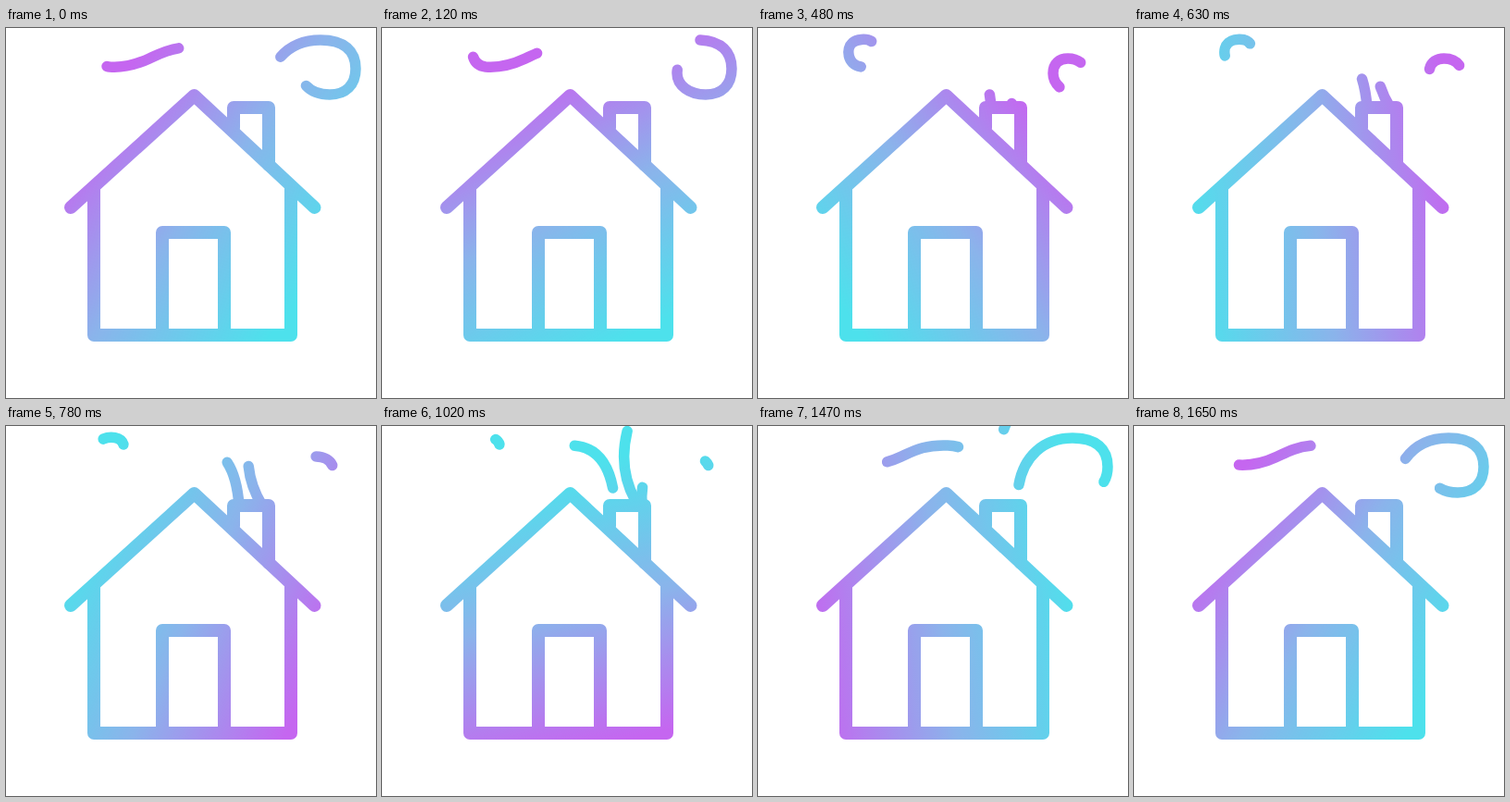
An HTML page without scripts that plays this animation: 400 px wide and 400 px high, repeating every 1680 ms.

```html
<!DOCTYPE html>
<html lang="en">
<head>
<meta charset="utf-8">
<title>House with smoke</title>
<style>
  @property --head { syntax: "<number>"; inherits: false; initial-value: 0; }
  @property --tail { syntax: "<number>"; inherits: false; initial-value: 0; }

  html, body { margin: 0; width: 100%; height: 100%; overflow: hidden; background: #fff; }
  svg { display: block; width: 100%; height: 100%; }

  .line { fill: none; stroke: #fff; stroke-linecap: round; stroke-linejoin: round; }
  .house { stroke-width: 14; }
  .smoke { stroke-width: 11.5; }

  /* The colour field turns once per loop behind the line mask. */
  .field { transform-origin: 200px 200px; animation: turn 1.68s linear infinite; }
  @keyframes turn {
    from { transform: rotate(-52deg); }
    to { transform: rotate(308deg); }
  }

  /* Each puff is the stretch of its path between tail and head. */
  .smoke path {
    stroke-dasharray: calc((var(--head) - var(--tail)) * 1px) 999px;
    stroke-dashoffset: calc(var(--tail) * -1px);
    animation: 3.36s linear infinite;
  }
  .smoke .left { animation-name: left-head, left-tail; }
  .smoke .mid { animation-name: mid-head, mid-tail; animation-duration: 1.68s; }
  .smoke .right { animation-name: right-head, right-tail; }
  /* Side puffs outlive one loop, so a second copy runs one loop ahead. */
  .smoke .late { animation-delay: -1.68s; }

  @keyframes left-head {
    0%, 10.1% { --head: 0; }
    14.3% { --head: 14; }
    23.2% { --head: 48; }
    30.4% { --head: 85; }
    37.5% { --head: 125; }
    50% { --head: 186; }
    57.1% { --head: 216; }
    64.3% { --head: 239; }
    73.2%, to { --head: 246; }
  }
  @keyframes left-tail {
    0%, 23.8% { --tail: 0; }
    30.4% { --tail: 19; }
    37.5% { --tail: 47; }
    50% { --tail: 106; }
    57.1% { --tail: 145; }
    64.3% { --tail: 184; }
    73.2% { --tail: 221; }
    80.4% { --tail: 239; }
    85.6% { --tail: 245; }
    85.7%, to { --tail: 900; }
  }
  @keyframes mid-head {
    0%, 26.2% { --head: 0; }
    28.6% { --head: 5; }
    46.4% { --head: 45; }
    60.7% { --head: 83; }
    75%, to { --head: 119; }
  }
  @keyframes mid-tail {
    0%, 48.8% { --tail: 0; }
    60.7% { --tail: 6; }
    75% { --tail: 43; }
    97.6%, to { --tail: 119; }
  }
  @keyframes right-head {
    0%, 27.4% { --head: 0; }
    30.4% { --head: 19; }
    37.5% { --head: 102; }
    43.75% { --head: 173; }
    50% { --head: 227; }
    57.1% { --head: 262; }
    64.3% { --head: 280; }
    71.4%, to { --head: 286.5; }
  }
  @keyframes right-tail {
    0%, 36.9% { --tail: 0; }
    43.5% { --tail: 20; }
    50% { --tail: 56; }
    57.1% { --tail: 156; }
    64.3% { --tail: 225; }
    73.2% { --tail: 266; }
    80.4% { --tail: 281; }
    86.3%, 89.8% { --tail: 286; }
    89.9%, to { --tail: 900; }
  }
</style>
</head>
<body>
<svg viewBox="0 0 400 400">
  <defs>
    <linearGradient id="tint" gradientUnits="userSpaceOnUse" x1="0" y1="50" x2="0" y2="350">
      <stop offset="0" stop-color="#c566f0"/>
      <stop offset=".5" stop-color="#8ab4eb"/>
      <stop offset="1" stop-color="#4de1ec"/>
    </linearGradient>
    <mask id="lines" maskUnits="userSpaceOnUse" x="0" y="0" width="400" height="400">
      <g class="line house">
        <path d="M70 194 203.5 73 333.5 194"/>
        <path d="M95 174V332H308V174"/>
        <path d="M169 332V221H236V332"/>
        <path d="M246 108V86H284V148"/>
      </g>
      <g class="line smoke">
        <path class="left" pathLength="246" d="M252 86C250 60 243 22 205 21C180 20 168 27 155 33C140 40 125 43 112 42C96 40 95 22 102 16C108 11 124 10 127 20"/>
        <path class="left late" pathLength="246" d="M252 86C250 60 243 22 205 21C180 20 168 27 155 33C140 40 125 43 112 42C96 40 95 22 102 16C108 11 124 10 127 20"/>
        <path class="mid" pathLength="119" d="M277 86C262 62 258 35 265 6C268 -5 276 -16 285 -24"/>
        <path class="right" pathLength="287" d="M281 86C278 45 300 13 340 13C366 13 378 25 378 44C378 62 367 72 350 72C332 72 319 62 319 49C319 38 326 33 335 33C345 33 351 38 353 43"/>
        <path class="right late" pathLength="287" d="M281 86C278 45 300 13 340 13C366 13 378 25 378 44C378 62 367 72 350 72C332 72 319 62 319 49C319 38 326 33 335 33C345 33 351 38 353 43"/>
      </g>
    </mask>
  </defs>
  <g mask="url(#lines)">
    <rect class="field" x="-200" y="-200" width="800" height="800" fill="url(#tint)"/>
  </g>
</svg>
</body>
</html>
```
